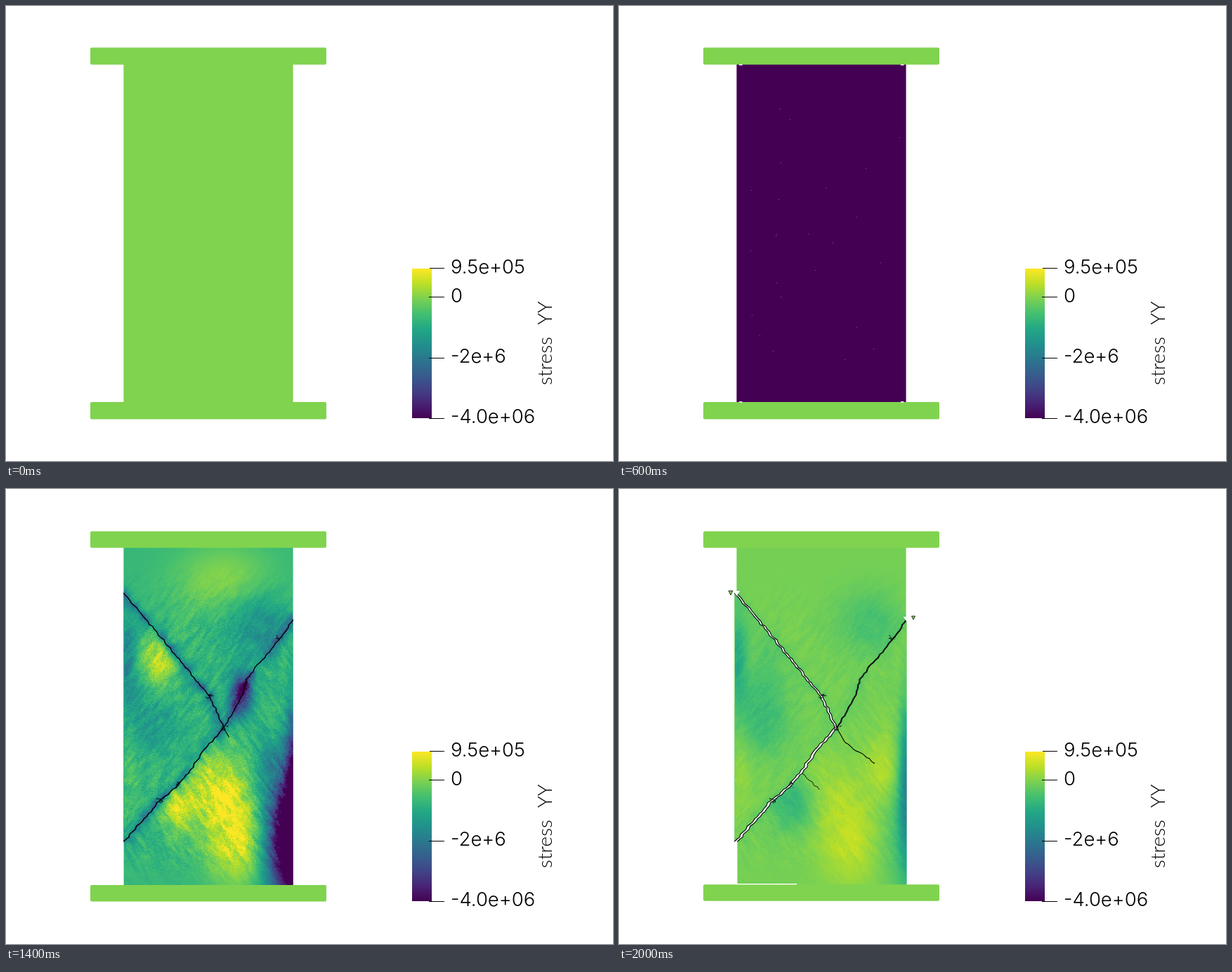
An HTML page with a canvas that plays this animation: 864 by 648 pixels, repeating every 7000 ms.

```html
<!DOCTYPE html>
<html lang="en">
<head>
<meta charset="utf-8">
<title>Stress YY in a compressed specimen</title>
<style>
html, body { margin: 0; width: 100%; height: 100%; overflow: hidden; background: #fff; }
#stage { position: relative; width: 864px; height: 648px; overflow: hidden; background: #fff; }
canvas, svg { position: absolute; left: 0; top: 0; }
#bar { position: absolute; left: 578px; top: 374px; width: 28px; height: 213px; }
.num { font: 300 27.5px Inter, Lato, sans-serif; }
.title { font: 300 28px Lato, sans-serif; }
</style>
</head>
<body>
<div id="stage">
  <canvas id="view" width="864" height="648"></canvas>
  <div id="bar"></div>
  <svg width="864" height="648">
    <path d="M603 373.5h21M602 414.5h22M602 501.5h22M602 587.5h22" stroke="#000"/>
    <g class="num">
      <text x="633" y="381">9.5e+05</text>
      <text x="633" y="422">0</text>
      <text x="633" y="508">-2e+6</text>
      <text x="633" y="594">-4.0e+06</text>
    </g>
    <g class="title" transform="translate(777 540) rotate(-90)">
      <text>stress</text>
      <text x="86">YY</text>
    </g>
  </svg>
</div>
<script>
const LOOP = 7000, STEP = 100, LAST = 20;
const PEAK = 11, SPLIT = 14;  // steps at which the load peaks and the pieces part
const GREEN = '#80d34e', DARK = '#440154';
const L = 167.4, R = 408.6, TOP = 83, BOTTOM = 565;
const ctx = document.getElementById('view').getContext('2d');

const mix = (a, b, k) => a + (b - a) * k;
const clamp = v => Math.max(0, Math.min(1, v));

// Viridis colour scale
const stops = ['440154', '482475', '414487', '355f8d', '2a788e', '21918c',
  '22a884', '44bf70', '7ad151', 'bddf26', 'fde725'];
const rgb = stops.map(h => [0, 2, 4].map(k => parseInt(h.slice(k, k + 2), 16)));
document.getElementById('bar').style.background =
  `linear-gradient(to top, ${stops.map(h => '#' + h).join()})`;

function seeded(seed) {
  return () => {
    seed = (seed * 1664525 + 1013904223) >>> 0;
    return seed / 4294967296;
  };
}
function hash(x, y) {
  const s = Math.sin(x * 127.1 + y * 311.7) * 43758.5453;
  return s - Math.floor(s);
}
function valueNoise(x, y) {
  const i = Math.floor(x), j = Math.floor(y);
  const ease = f => f * f * (3 - 2 * f);
  const fx = ease(x - i), fy = ease(y - j);
  return mix(mix(hash(i, j), hash(i + 1, j), fx),
             mix(hash(i, j + 1), hash(i + 1, j + 1), fx), fy) - 0.5;
}

// Crack lines: a few corners, roughened in between
const HUB = [310, 340];
const corners = {
  a: [[L, 148], [192, 177], [240, 235], [290, 295], HUB],
  up: [[R, 186], [390, 213], [342, 271], [337, 293], HUB],
  down: [HUB, [283, 370], [260, 405], [245, 422], [219, 444], [190, 477], [L, 502]],
  c: [HUB, [322, 361], [364, 391]],
  d: [[260, 405], [285, 428]]
};
const { a, up, down } = corners;
const knots = [a[3], up[1], HUB, down[3], down[4]];

const rand = seeded(11);
const jitter = () => (rand() - 0.5) * 2.2;
function rough(pts) {
  const out = [pts[0]];
  for (let k = 1; k < pts.length; k++) {
    const [x0, y0] = pts[k - 1], [x1, y1] = pts[k];
    const n = Math.max(1, Math.round(Math.hypot(x1 - x0, y1 - y0) / 5));
    for (let s = 1; s < n; s++) {
      out.push([mix(x0, x1, s / n) + jitter(), mix(y0, y1, s / n) + jitter()]);
    }
    out.push([x1, y1]);
  }
  return out;
}
function toPath(pts, closed) {
  const p = new Path2D();
  pts.forEach(([x, y]) => p.lineTo(x, y));
  if (closed) p.closePath();
  return p;
}
const lines = {}, paths = {}, lengths = {};
for (const k in corners) {
  lines[k] = rough(corners[k]);
  paths[k] = toPath(lines[k]);
  lengths[k] = lines[k].reduce((sum, p, n, all) =>
    n ? sum + Math.hypot(p[0] - all[n - 1][0], p[1] - all[n - 1][1]) : 0, 0);
}
const topPiece = toPath([[L, TOP], [R, TOP], ...lines.up, ...[...lines.a].reverse()], true);
const leftPiece = toPath([...lines.a, ...lines.down], true);
const lowPiece = toPath([...lines.up, ...lines.down, [L, BOTTOM], [R, BOTTOM]], true);
const crackPoints = [...lines.a, ...lines.up, ...lines.down];

// Soft stress zones; each has one strength per phase of the collapse
const zone = (piece, x, y, sx, sy, ...strength) => ({ piece, x, y, sx, sy, strength });
const zones = [
  zone('top', 310, 130, 50, 38, .16, .04, .01, 0),
  zone('top', 355, 190, 32, 32, -.18, -.08, -.07, -.09),
  zone('left', 170, 240, 11, 48, -.2, .25, -.28, -.18),
  zone('left', 217, 245, 17, 32, .26, .06, .06, -.05),
  zone('left', 205, 325, 28, 40, -.13, .06, .02, -.12),
  zone('left', 176, 395, 16, 48, .06, .2, -.05, .05),
  zone('any', 334, 292, 12, 22, -.45, -.25, -.22, 0),
  zone('low', 302, 420, 28, 38, .26, .12, -.12, .05),
  zone('low', 328, 500, 30, 48, .28, .24, .03, .11),
  zone('low', 246, 450, 20, 26, .25, -.16, -.36, -.14),
  zone('low', 374, 395, 16, 32, -.1, .22, .25, .1),
  zone('low', 406, 500, 24, 65, -1, -.15, -.02, -.1),
  zone('any', 409, 420, 8, 75, -.5, -.8, -.4, -.32)
];
const phases = [
  { base: .66, noise: .12, shade: .5 },
  { base: .78, noise: .07, shade: .2 },
  { base: .79, noise: .05, shade: .12 },
  { base: .79, noise: .04, shade: .06 }
];

// The field lives on a grid of small cells
const CELL = 2, X0 = 164, Y0 = 82, COLS = 125, ROWS = 243;
function makeCell(c, r) {
  const x = X0 + (c + 0.5) * CELL, y = Y0 + (r + 0.5) * CELL;
  const piece = ctx.isPointInPath(topPiece, x, y) ? 'top'
    : ctx.isPointInPath(leftPiece, x, y) ? 'left' : 'low';
  const tilt = piece === 'low' ? 1 : -1;
  const across = x * 0.8 - tilt * y * 0.6, along = tilt * x * 0.6 + y * 0.8;
  const calm = clamp((y - 100) / 110) * clamp((575 - y) / 60);
  const grain = calm * (valueNoise(across / 4, along / 15) + 0.6 * (hash(c, r) - 0.5));
  const near = Math.min(...crackPoints.map(p => Math.hypot(p[0] - x, p[1] - y)));
  const shade = Math.exp(-near / 6) * (0.5 + valueNoise(x / 14, y / 14));
  return { x, y, piece, grain, shade };
}
const cells = Array.from({ length: COLS * ROWS }, (_, n) => makeCell(n % COLS, Math.floor(n / COLS)));

const fields = phases.map(({ base, noise, shade }, n) => Float32Array.from(cells, cell => {
  let u = base - shade * cell.shade;
  for (const z of zones) {
    if (z.piece !== 'any' && z.piece !== cell.piece) continue;
    const q = ((cell.x - z.x) / z.sx) ** 2 + ((cell.y - z.y) / z.sy) ** 2;
    u += z.strength[n] * Math.exp(-q / 2);
  }
  return u + cell.grain * noise * (1 + 1.5 * Math.abs(u - base));
}));

const grid = document.createElement('canvas');
grid.width = COLS;
grid.height = ROWS;
const gctx = grid.getContext('2d');
const img = gctx.createImageData(COLS, ROWS);

const released = i => clamp((i - PEAK) / (SPLIT - PEAK) * 1.15);

function paintField(i) {
  const loose = released(i);
  const pos = Math.max(0, (i - SPLIT) / 2), n = Math.floor(pos);
  const from = fields[n], to = fields[Math.min(3, n + 1)];
  for (let k = 0; k < cells.length; k++) {
    const u = mix(-.5, mix(from[k], to[k], pos - n), loose);
    const s = clamp(u) * 10, j = Math.min(9, Math.floor(s));
    for (let ch = 0; ch < 3; ch++) img.data[k * 4 + ch] = mix(rgb[j][ch], rgb[j + 1][ch], s - j);
    img.data[k * 4 + 3] = 255;
  }
  gctx.putImageData(img, 0, 0);
}

function strokeLine(name, width, part) {
  ctx.lineWidth = width;
  ctx.setLineDash(part < 1 ? [lengths[name] * part, 9999] : []);
  ctx.stroke(paths[name]);
  ctx.setLineDash([]);
}

function drawPiece(path, dx, edges, part) {
  ctx.save();
  ctx.translate(dx, 0);
  ctx.save();
  ctx.clip(path);
  ctx.drawImage(grid, X0, Y0, COLS * CELL, ROWS * CELL);
  ctx.restore();
  edges.forEach(e => strokeLine(e, 1.1, part));
  ctx.restore();
}

function drawKnots() {
  const r = seeded(5), off = size => (r() - 0.5) * size;
  ctx.lineWidth = 1;
  ctx.beginPath();
  for (const [x, y] of knots) {
    for (let k = 0; k < 9; k++) {
      const px = x + off(8), py = y + off(8);
      ctx.moveTo(px, py);
      ctx.lineTo(px + off(6), py + off(6));
    }
  }
  ctx.stroke();
}

function triangle(x, y, w, h, fill, outline) {
  ctx.beginPath();
  ctx.moveTo(x - w, y);
  ctx.lineTo(x + w, y);
  ctx.lineTo(x, y + h);
  ctx.closePath();
  ctx.fillStyle = fill;
  ctx.fill();
  if (outline) {
    ctx.lineWidth = 0.8;
    ctx.stroke();
  }
}

// Chips fly off where the cracks meet the sides
function drawChips(open) {
  triangle(L, 145, 5, 7, '#fff');
  triangle(R + 1, 182, 5, 7, '#fff');
  triangle(168 - 1.5 * open, 145, 3, 6, GREEN, true);
  triangle(408.5 + 1.75 * open, 181, 2.5, 5, GREEN, true);
}

function drawBroken(i) {
  const open = Math.max(0, i - SPLIT), split = i >= SPLIT, part = released(i);
  paintField(i);
  ctx.imageSmoothingEnabled = false;
  ctx.strokeStyle = '#000';
  drawPiece(topPiece, 0, ['a', 'up'], part);
  drawPiece(leftPiece, split ? -.3 - .48 * open : 0, ['a', 'down'], part);
  drawPiece(lowPiece, split ? .2 + .14 * open : 0, ['up', 'down'], part);
  if (!split) return;
  strokeLine('c', 1.1, .2 + .2 * open);
  drawKnots();
  if (open) {
    strokeLine('d', 0.9, 1);
    drawChips(open);
  }
}

// Specks multiply as the load rises
function drawSpecks(i) {
  const r = seeded(23);
  ctx.fillStyle = 'rgba(190,180,190,.5)';
  for (let k = 0; k < 6 * (i - 2); k++) {
    ctx.fillRect(Math.floor(mix(170, 406, r())), Math.floor(mix(130, 530, r())), 1, 1);
  }
}

function drawPlate(y, h) {
  ctx.fillStyle = GREEN;
  ctx.beginPath();
  ctx.roundRect(120, y, 336, h, 2);
  ctx.fill();
}

function drawGaps(i) {
  ctx.fillStyle = '#fff';
  if (i > 0 && i < SPLIT) {
    for (const x of [171, 401]) {
      ctx.fillRect(x, 83, 4.5, 1.5);
      ctx.fillRect(x, 563.2, 4.5, 1.5);
    }
  }
  if (i >= 16) {
    const width = 241 - 30 * Math.max(0, 18 - i) - 78 * Math.max(0, i - 18);
    ctx.fillRect(168, i > 18 ? 562 : 563, width, 1.4);
  }
}

function draw(i) {
  ctx.clearRect(0, 0, 864, 648);
  if (i > PEAK) {
    drawBroken(i);
  } else {
    ctx.fillStyle = i ? DARK : GREEN;
    ctx.fillRect(L, TOP, R - L, BOTTOM - TOP);
    drawSpecks(i);
  }
  const relaxed = i > PEAK + 1, h = relaxed ? 23.6 : 24.4;
  drawPlate(relaxed ? 60.2 : 59.2, h);
  drawPlate(i > 18 ? 563.2 : 564, h);
  drawGaps(i);
}

let shown = -1;
function tick(now) {
  const i = Math.min(LAST, Math.floor((now % LOOP) / STEP));
  if (i !== shown) draw(shown = i);
  requestAnimationFrame(tick);
}
draw(shown = 0);
requestAnimationFrame(tick);
</script>
</body>
</html>
```
